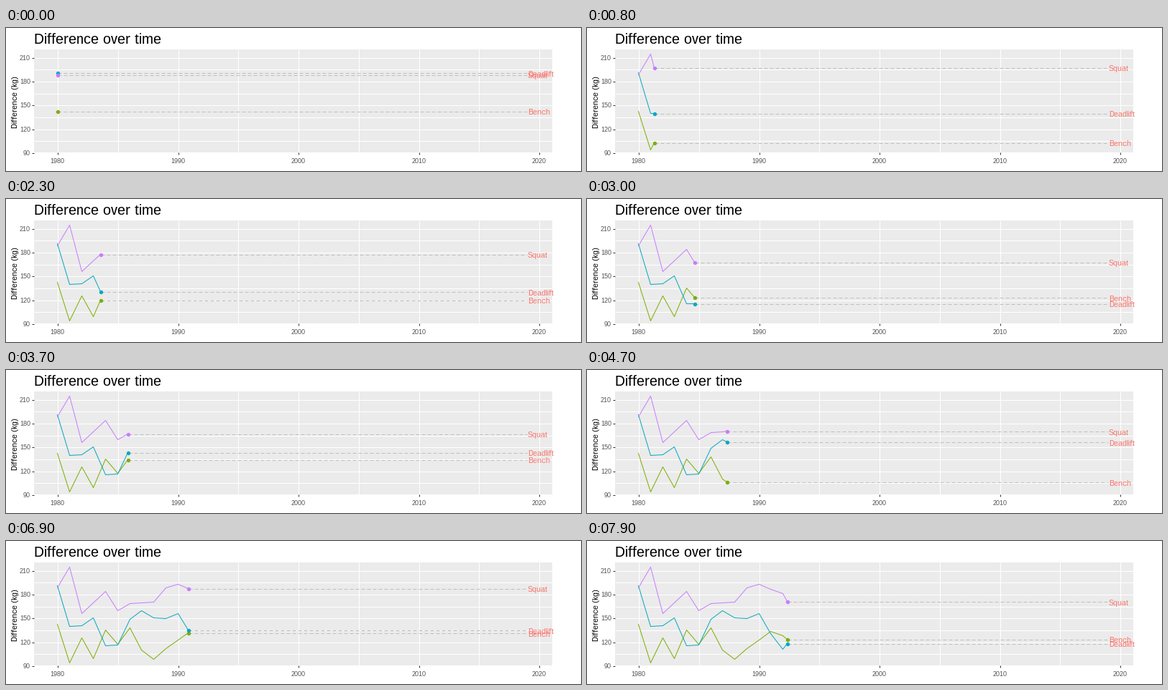
These frames come from a looping animation (800 by 200 pixels, 8000 ms). A matplotlib script:

```python
import matplotlib.pyplot as plt
import numpy as np
from matplotlib.animation import FuncAnimation
from matplotlib.patches import Rectangle

PX = 0.72  # points per pixel at 100 dpi
FRAMES, STEP = 80, 100

plt.rcParams.update({
    "font.family": "Liberation Sans",
    "text.hinting": "native",
    "text.hinting_factor": 1,
    "toolbar": "None",
})

YEARS = np.arange(14)
# Every year is pinned to a whole step; 39 years fill 249 steps
KEYS = np.round(YEARS * 249 / 39)


def lift(levels, swing, decay, turn):
    """Levels every second year; a fading swing moves the years between."""
    values = np.interp(YEARS, np.arange(0, 15, 2), levels)
    j = np.arange(7)
    values[1::2] += swing * decay**j * np.cos(turn * np.pi * j)
    return values


SERIES = {
    "Bench": ("#7CAE00", lift([142, 125, 135, 137, 98, 122, 127, 80],
                              -40, 0.85, 0.13)),
    "Deadlift": ("#06A8C1", lift([190, 140, 115, 148, 150, 155, 110, 141],
                                 -26, 0.9, 0.89)),
    "Squat": ("#C77CFF", lift([188, 155, 183, 168, 170, 192, 180, 126],
                              42, 0.63, 0.5)),
}


def px(year):
    return 71.7 + 16.75 * (np.asarray(year) - 1980)


def py(value):
    return 174.1 - 1.1125 * (np.asarray(value) - 90)


def snap(v):
    return np.floor(v) + 0.5


fig = plt.figure(figsize=(8, 2), dpi=100, facecolor="white")
ax = fig.add_axes([0, 0, 1, 1])
ax.set(xlim=(0, 800), ylim=(200, 0))
ax.axis("off")


def rule(xs, ys, color, z):
    ax.plot(xs, ys, color=color, lw=PX, zorder=z, solid_capstyle="butt")


def label(x, y, s, size, color, **kw):
    return ax.text(x, y, s, fontsize=size * PX, color=color, zorder=8,
                   va="baseline", **kw)


# Panel, grid and axes
ax.add_patch(Rectangle((39, 30), 721, 144, fc="#EBEBEB", ec="none", zorder=0))
for value in range(90, 211, 15):
    y = snap(py(value) + 0.5)
    rule([39, 760], [y, y], "white", 1)
    if value % 30 == 0:
        rule([36, 39], [y, y], "#333333", 2)
        label(34, int(y) + 4, str(value), 9, "#4D4D4D", ha="right")
for year in range(1980, 2021, 5):
    x = snap(px(year))
    rule([x, x], [30, 174], "white", 1)
    if year % 10 == 0:
        rule([x, x], [174, 177], "#333333", 2)
        label(x, 189, str(year), 9, "#4D4D4D", ha="center")
label(39, 22, "Difference over time", 20, "black")
label(16, 103, "Difference (kg)", 11, "black", rotation=90,
      rotation_mode="anchor", ha="center")

# Moving parts
parts = []
for name, (color, values) in SERIES.items():
    line, = ax.plot([], [], color=color, lw=PX, zorder=3)
    guide, = ax.plot([], [], color="#BEBEBE", lw=PX, ls=(0, (5, 3)),
                     zorder=4, dash_capstyle="butt")
    dot, = ax.plot([], [], "o", color=color, ms=5.4 * PX, mew=0, zorder=5)
    tag = label(726, 0, name, 11, "#F8766D")
    parts.append((values, line, guide, dot, tag))


def draw(i):
    t = np.interp(i, KEYS, YEARS)
    n = int(t) + 1
    xs = snap(px(1980 + np.append(YEARS[:n], t)))
    for values, line, guide, dot, tag in parts:
        now = np.interp(t, YEARS, values)
        ys = snap(py(np.append(values[:n], now)))
        line.set_data(xs, ys)
        guide.set_data([xs[-1], px(2019)], [ys[-1]] * 2)
        dot.set_data(xs[-1:], ys[-1:])
        tag.set_y(round(float(py(now)) + 4.8))
    return [artist for part in parts for artist in part[1:]]


anim = FuncAnimation(fig, draw, frames=FRAMES, interval=STEP, repeat=True,
                     repeat_delay=0, blit=False)
plt.show()
```
